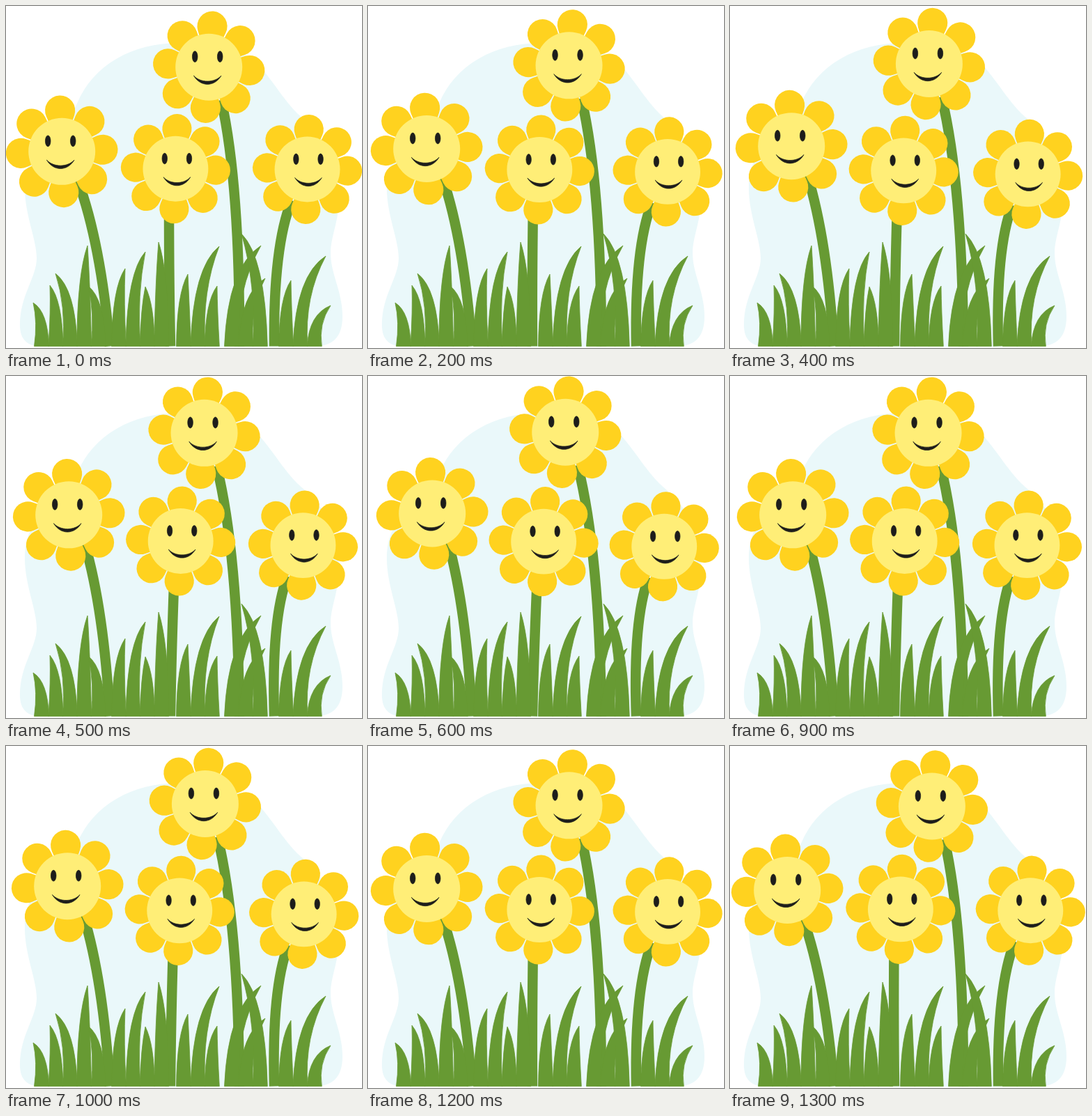
Recreate the animation shown at these times as an HTML page. Size 511 by 491 pixels, loop 1400 ms.

```html
<!DOCTYPE html>
<html lang="en">
<head>
<meta charset="utf-8">
<title>Smiling flowers</title>
<style>
  html, body { margin: 0; width: 100%; height: 100%; overflow: hidden; background: #fff; }
  svg { display: block; width: 100%; height: 100%; }
  .blob { fill: #eaf8fa; }
  .blade { fill: #679a33; stroke: #679a33; stroke-width: .8; stroke-linejoin: round; }
  .stem { fill: none; stroke: #679a33; stroke-width: 14.5; }
  .petal { fill: #ffd21f; }
  .disc { fill: #ffee77; }
  .ink { fill: #1d1d1b; stroke: #1d1d1b; stroke-width: .7; stroke-linejoin: round; }
</style>
</head>
<body>
<svg id="stage" viewBox="0 0 511 491">
  <path class="blob" d="M250 53C180 53 125 85 102 140C85 180 28 190 27 262C27 300 44 335 44 362C44 390 20 415 20 458C20 480 32 489 52 489H440C470 489 483 475 483 445C483 410 466 385 466 355C466 330 478 310 478 275C478 215 455 190 428 163C400 140 385 108 360 82C335 58 290 53 250 53Z"/>
</svg>
<script>
const stage = document.getElementById('stage');
const GROUND = 488.5, STEP = 100, HALF = 7;

// head centre, total drift, petal turn, face shift; stem: neck, bend and foot
const flowers = [
  { at: [291.2, 87.7], drift: [-9.3, -8.2], size: 1, turn: 4.7, face: -2,
    neck: [309, 135], bend: [336, 258], foot: 335 },
  { at: [80.2, 208.8], drift: [14, -13.3], size: 1, turn: -2.5, face: -2,
    neck: [103, 250], bend: [136, 340], foot: 149 },
  { at: [243.4, 233.7], drift: [10.2, 4.6], size: .978, turn: 2, face: 2,
    neck: [234, 290], bend: [234, 400], foot: 236 },
  { at: [432.5, 234.5], drift: [-8.5, 12], size: .978, turn: 2.2, face: 1.5,
    neck: [410, 279], bend: [383.5, 345], foot: 385 }
];

// Evenly spaced blades, grouped in tufts: first foot, then the tips.
const SPACING = 20.4, BLADE = 21;
const tufts = [
  { foot: 51, tips: [[39, 426], [63, 401], [71, 384], [117, 344], [118, 402]] },
  { foot: 162, tips: [[171, 377], [200, 353], [200, 403], [219, 339]] },
  { foot: 255, tips: [[261, 385], [306, 345], [303, 402]] },
  { foot: 324, tips: [[366, 344], [372, 391], [338, 327]] },
  { foot: 402, tips: [[409, 394], [459, 359], [466, 430]] }
];

function add(parent, tag, attrs) {
  const el = document.createElementNS('http://www.w3.org/2000/svg', tag);
  for (const key in attrs) el.setAttribute(key, attrs[key]);
  return parent.appendChild(el);
}

function drawHead(f) {
  const head = add(stage, 'g');
  const body = add(head, 'g', { transform: `scale(${f.size})` });
  // Each petal is a wedge from the centre, closed by a round cap.
  for (let i = 0; i < 8; i++) {
    add(body, 'path', {
      class: 'petal',
      d: 'M0 0L50.9 -20.1A21.6 21.6 0 1 1 50.9 20.1Z',
      transform: `rotate(${f.turn + i * 45})`
    });
  }
  add(body, 'circle', { class: 'disc', r: 48 });
  const face = add(body, 'g', { class: 'ink', transform: `translate(${f.face} 0)` });
  for (const side of [-18, 18]) add(face, 'ellipse', { cx: side, cy: -15, rx: 3.8, ry: 7.9 });
  add(face, 'path', { d: 'M-19.8 12.3C-10 28.8 10 28.8 19.8 12.3C10 23 -10 23 -19.8 12.3Z' });
  return head;
}

// The side facing away from the lean bulges high, the other hollows low.
function drawBlade(foot, [x, y]) {
  const left = foot - BLADE / 2, right = foot + BLADE / 2;
  const lean = x - foot, h = GROUND - y;
  const k = Math.max(-1, Math.min(1, lean / 12));
  const inset = side => k * side < 0 ? .12 * lean : -5 * k;
  const control = (edge, side) => `${edge + inset(side)} ${y + h * (.33 + .12 * k * side)}`;
  add(stage, 'path', {
    class: 'blade',
    d: `M${x} ${y}Q${control(left, -1)} ${left} ${GROUND}H${right}Q${control(right, 1)} ${x} ${y}Z`
  });
}

for (const f of flowers) {
  f.stem = add(stage, 'path', { class: 'stem' });
  f.head = drawHead(f);
}
for (const { foot, tips } of tufts) {
  tips.forEach((tip, i) => drawBlade(foot + i * SPACING, tip));
}

// Heads drift straight; stems bend after them, rooted at the ground.
function pose(p) {
  for (const { at, drift, neck, bend, foot, head, stem } of flowers) {
    const shift = (point, part) => point.map((v, i) => v + drift[i] * part * p).join(' ');
    head.setAttribute('transform', `translate(${shift(at, 1)})`);
    stem.setAttribute('d', `M${shift(neck, 1)}Q${shift(bend, .45)} ${foot} ${GROUND}`);
  }
}

let start;
function tick(now) {
  start ??= now;
  const k = Math.floor((now - start) / STEP) % (2 * HALF);
  pose(1 - Math.abs(HALF - k) / HALF);
  requestAnimationFrame(tick);
}
pose(0);
requestAnimationFrame(tick);
</script>
</body>
</html>
```
